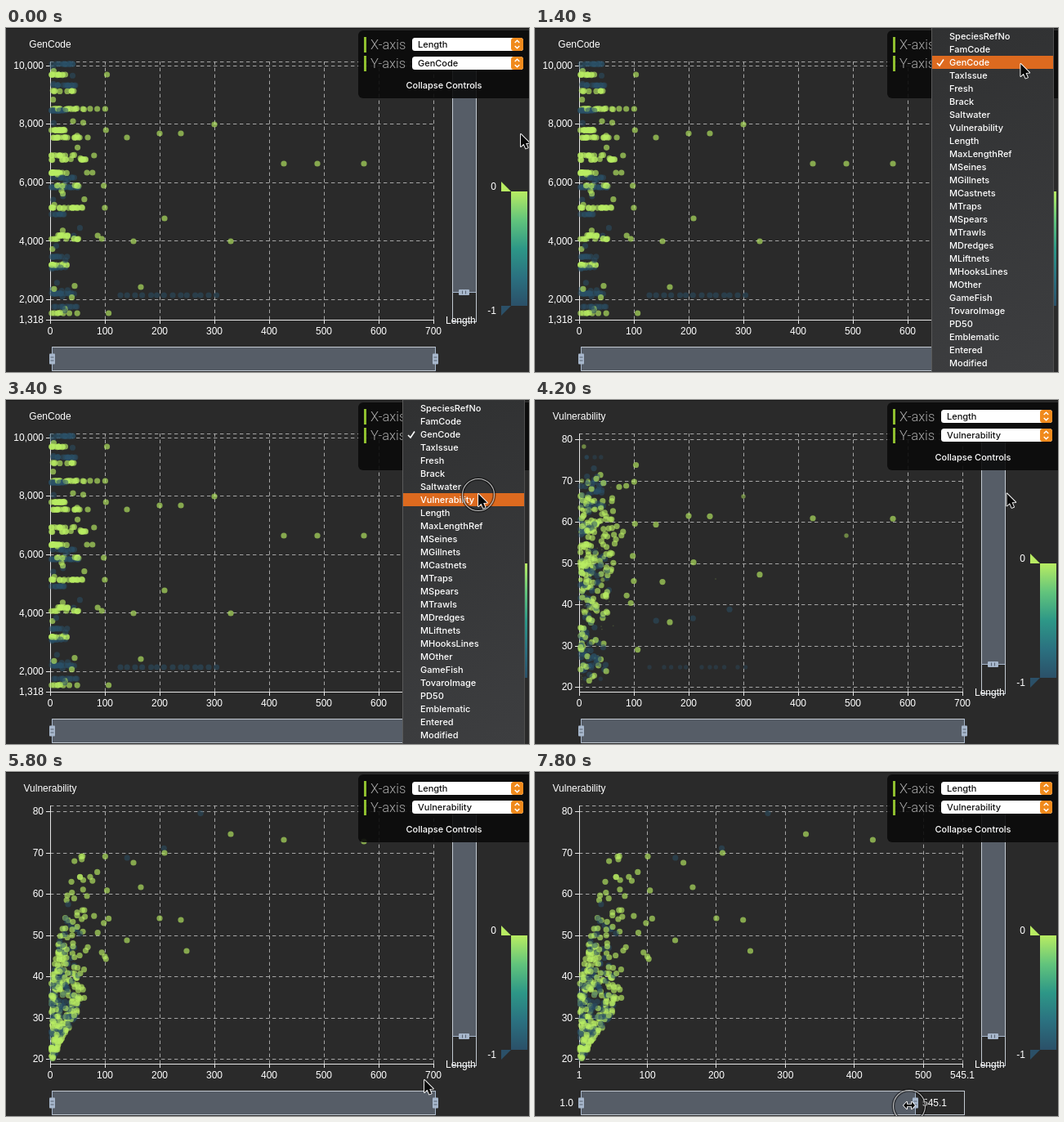
An HTML page with a canvas for the animation above (8 s loop, 640x421 px).

```html
<!DOCTYPE html>
<html lang="en">
<head>
<meta charset="utf-8">
<title>Scatter plot with axis controls</title>
<style>
  html, body { margin: 0; width: 100%; height: 100%; overflow: hidden; background: #2a2a2a; }
  canvas { display: block; width: 640px; height: 421px; }
</style>
</head>
<body>
<canvas id="stage" width="640" height="421"></canvas>
<script>
const ctx = document.getElementById('stage').getContext('2d');
const LOOP = 8000, STEP = 200;
const LABEL = '12px "Liberation Sans", Arial, sans-serif';
const UI = '500 11px Inter, Roboto, sans-serif';
const GREEN = '#b8ec62', BLUE = '#2b5068', WHITE = '#fff', EDGE = '#c3cad2', GRIP = '#a7b7cc';
const LEFT = 54, RIGHT = 523, TOP = 41, BOTTOM = 357;
const MENU_OPEN = 1400, MENU_CLOSE = 3800, SWITCH = 4000, HOVER = 6400, DRAG = 7200;

const FIELDS = ('SpeciesRefNo FamCode GenCode TaxIssue Fresh Brack Saltwater Vulnerability Length ' +
  'MaxLengthRef MSeines MGillnets MCastnets MTraps MSpears MTrawls MDredges MLiftnets MHooksLines ' +
  'MOther GameFish TovaroImage PD50 Emblematic Entered Modified').split(' ');

// pointer: time, x, y
const PATH = [
  [0, 630, 130], [1000, 597, 46], [1600, 593, 43], [3400, 578, 115],
  [4800, 577, 114], [5800, 512, 377], [6600, 521, 400], [DRAG, 521, 400], [7800, 458, 408]
];

// heights of the rows in the first view
const GREEN_ROWS = [57, 77, 99, 125, 134, 156, 161, 177, 193, 220, 254, 258, 290, 349];
const BLUE_ROWS = [44, 70, 101, 183, 195, 228, 280, 293, 325, 341];
// lone dots: x, height before, height after (0 = absent)
const LONE = [
  [340, 166, 83], [438, 166, 85], [381, 166, 0], [275, 261, 76], [188, 129, 179], [214, 129, 181],
  [255, 118, 0], [194, 233, 99], [156, 261, 111], [148, 134, 206], [165, 317, 141], [221, 0, 219]
];

const clamp = (v, a, b) => Math.min(b, Math.max(a, v));
const lerp = (a, b, k) => a + (b - a) * k;
const easeInOut = k => k < .5 ? 4 * k ** 3 : 1 - (2 - 2 * k) ** 3 / 2;

function seeded(s) {
  return () => {
    s = (s + 0x6D2B79F5) | 0;
    let r = Math.imul(s ^ (s >>> 15), 1 | s);
    r = (r + Math.imul(r ^ (r >>> 7), 61 | r)) ^ r;
    return ((r ^ (r >>> 14)) >>> 0) / 4294967296;
  };
}

function makeDots() {
  const rnd = seeded(11), dots = [];
  const add = (x, y1, y2, color, key = rnd()) =>
    dots.push({ v: (x - LEFT) / .67, y1, y2, color, key });

  // vulnerability rises with length, between a steep and a flat bound
  const rise = x => {
    const d = x - LEFT, low = 357 - 1.9 * d, high = Math.max(93, 264 - 5.4 * d);
    return lerp(low, high, rnd() ** 1.35);
  };
  const addRows = (rows, color) => rows.forEach(y => {
    const reach = 16 + 32 * rnd(), n = 7 + 12 * rnd();
    for (let i = 0; i < n; i++) {
      const x = 55.5 + reach * rnd() ** 1.3;
      add(x, y + 5 * (rnd() - .5) ** 3, rnd() < .15 ? 0 : rise(x), color);
    }
  });
  addRows(BLUE_ROWS, BLUE);
  addRows(GREEN_ROWS, GREEN);

  // strays off the rows, and dots only the second view has
  for (let i = 0; i < 80; i++) {
    const x = 56 + 40 * rnd() ** 1.4;
    add(x, i % 2 ? lerp(45, 352, rnd()) : 0, rise(x), i % 4 < 3 ? GREEN : BLUE);
  }
  for (let i = 0; i < 14; i++) {
    const y = GREEN_ROWS[Math.floor(rnd() * GREEN_ROWS.length)];
    add(92 + 36 * rnd(), y, lerp(95, 240, rnd()), GREEN);
  }
  for (let i = 0; i < 14; i++) {
    add(138 + 9 * i + 4 * rnd(), 327, i % 5 === 1 ? lerp(48, 127, rnd()) : 0, BLUE);
  }
  LONE.forEach(d => add(...d, GREEN));
  return dots.sort((a, b) => a.key - b.key);
}
const dots = makeDots();

function text(s, x, y, font = LABEL, color = WHITE, align = 'left') {
  ctx.font = font;
  ctx.fillStyle = color;
  ctx.textAlign = align;
  ctx.textBaseline = 'middle';
  ctx.fillText(s, x, y + .8);
}
function box(x, y, w, h, fill, r = 0) {
  ctx.fillStyle = fill;
  ctx.beginPath();
  ctx.roundRect(x, y, w, h, r);
  ctx.fill();
}
function frame(x, y, w, h, color) {
  ctx.strokeStyle = color;
  ctx.lineWidth = 1;
  ctx.strokeRect(x + .5, y + .5, w - 1, h - 1);
}
function path(pts, close) {
  ctx.beginPath();
  pts.forEach(([x, y]) => ctx.lineTo(x, y));
  if (close) ctx.closePath();
}
function stroke(color, width) {
  ctx.strokeStyle = color;
  ctx.lineWidth = width;
  ctx.stroke();
}
function triangle(x, y, dy, fill) {
  path([[x, y + dy], [x, y], [x + 12, y]], true);
  ctx.fillStyle = fill;
  ctx.fill();
}
function line(x1, y1, x2, y2, color, dash = []) {
  ctx.setLineDash(dash);
  path([[x1, y1], [x2, y2]]);
  stroke(color, 1);
  ctx.setLineDash([]);
}

const handleAt = t => lerp(525, 465, clamp((t - DRAG) / 600, 0, 1));
const valueAt = h => 1 + 609 * (h - 56) / 469;
// labels and plot trail behind the dragged handle
const topLabel = t => valueAt(handleAt(t - 100)).toFixed(1);
const xRange = t => t <= DRAG ? [0, 700] : [1, valueAt(handleAt(t - 190))];

function drawAxes(t, [min, max], toX) {
  const grid = '#a6a6a6', axis = '#e6e6e6', dash = [4.4, 3.6];
  const vuln = t >= SWITCH;
  const [first, step, count, y0, gap] = vuln ? [20, 10, 7, 351.5, 50.5] : [2000, 2000, 5, 332.5, 71.6];
  const drawTick = (v, y) => {
    const py = Math.floor(y) + .5;
    line(LEFT, py, RIGHT, py, grid, dash);
    line(LEFT - 5, py, LEFT, py, axis);
    text(v.toLocaleString('en-US'), 46, y - .5, LABEL, WHITE, 'right');
  };
  for (let i = 0; i < count; i++) drawTick(first + i * step, y0 - i * gap);
  if (!vuln) drawTick(1318, BOTTOM);
  line(LEFT, TOP + .5, RIGHT, TOP + .5, grid, dash);

  const marks = [min];
  for (let v = 100; v < max; v += 100) marks.push(v);
  marks.push(max);
  for (const v of marks) {
    const x = toX(v), px = Math.floor(x) + .5, last = v === max;
    line(px, BOTTOM, px, TOP, grid, dash);
    line(px, BOTTOM, px, BOTTOM + 5, axis);
    if (!last && RIGHT - x < 32) continue;
    text(last && t > DRAG ? topLabel(t) : v, x, 371, LABEL, WHITE, 'center');
  }
  line(LEFT + .5, TOP, LEFT + .5, BOTTOM, axis);
  line(LEFT, BOTTOM + .5, RIGHT, BOTTOM + .5, axis);
  text(vuln ? 'Vulnerability' : 'GenCode', LEFT, 20, LABEL, WHITE, 'center');
}

function drawDots(t, toX) {
  const k = easeInOut(clamp((t - SWITCH) / 500, 0, 1));
  ctx.save();
  ctx.beginPath();
  ctx.rect(LEFT - 4, TOP - 4, RIGHT - LEFT + 8, BOTTOM - TOP + 8);
  ctx.clip();
  for (const { v, y1, y2, color } of dots) {
    const size = !y1 ? k : !y2 ? 1 - k : 1;
    if (!size) continue;
    ctx.globalAlpha = (color === BLUE ? .52 : .65) * size;
    ctx.fillStyle = color;
    ctx.beginPath();
    ctx.arc(toX(v), y1 && y2 ? lerp(y1, y2, k) : y1 || y2, 3.6 * size, 0, 7);
    ctx.fill();
  }
  ctx.restore();
}

function drawGrip(x, y, turn) {
  ctx.save();
  ctx.translate(x, y);
  ctx.rotate(turn);
  box(-6.5, -3.5, 13, 7, GRIP, 1);
  box(-2.5, -2, 1, 4, '#56606e');
  box(1.5, -2, 1, 4, '#56606e');
  ctx.restore();
}

function drawSliders(t) {
  const fill = '#565d67', h = handleAt(t);
  box(546, TOP, 30, 282, fill);
  frame(546, TOP, 30, 319, EDGE);
  line(546, 323.5, 575, 323.5, GRIP);
  drawGrip(560.5, 323.5, 0);
  text('Length', 538, 357.5);

  box(56, 390, h - 56, 30, fill);
  frame(56, 390, 470, 30, EDGE);
  for (const x of [56.5, h + .5]) {
    line(x, 390, x, 420, GRIP);
    drawGrip(x, 405, Math.PI / 2);
  }
  if (t >= HOVER) {
    text('1.0', 47, 405, LABEL, WHITE, 'right');
    text(topLabel(t), h + 9, 405);
  }
}

function drawLegend() {
  const g = ctx.createLinearGradient(0, 200, 0, 340);
  [GREEN, '#62c47c', '#2d9787', '#2b7180', BLUE].forEach((c, i) => g.addColorStop(i / 4, c));
  box(618, 200, 20, 140, g);
  triangle(606, 200, -12, GREEN);
  triangle(606, 340, 12, BLUE);
  text('0', 600, 194, LABEL, WHITE, 'right');
  text('-1', 600, 345.5, LABEL, WHITE, 'right');
}

function drawSelect(y, label, value) {
  box(438, y - 9, 3, 19, '#8fbf2f');
  text(label, 446, y + .4, '300 16.5px Roboto, "Open Sans", sans-serif', '#a8a8a8');
  box(497, y - 8, 136, 16, WHITE, 3.5);
  text(value, 504, y - .3, UI, '#111');
  box(618, y - 8, 15, 16, '#f08a1c', 3.5);
  for (const s of [-1, 1]) {
    path([[622.7, y + s * 2], [625.5, y + s * 4.8], [628.3, y + s * 2]]);
    stroke(WHITE, 1.4);
  }
}

function drawPanel(t) {
  box(431, 3, 216, 83, 'rgba(10,10,10,.9)', 6);
  drawSelect(20, 'X-axis', 'Length');
  drawSelect(43, 'Y-axis', t >= MENU_CLOSE ? 'Vulnerability' : 'GenCode');
  text('Collapse Controls', 536, 70, UI, WHITE, 'center');
}

function drawMenu(y) {
  const g = ctx.createLinearGradient(486, 0, 634, 421);
  g.addColorStop(0, '#303132');
  g.addColorStop(1, '#3d3e40');
  box(486, 0, 148, 421, g);
  line(485.5, 0, 485.5, 421, '#5a5a5a');
  line(634.5, 0, 634.5, 421, '#505050');
  box(486, Math.floor((y - 2) / 16) * 16 + 2, 148, 16, '#dd6a1f');
  FIELDS.forEach((f, i) => text(f, 507, 9.7 + i * 16, UI));
  path([[492, 43], [495, 46], [500, 38.5]]);
  stroke(WHITE, 1.6);
}

function pointer(t) {
  const i = Math.max(1, PATH.findIndex(p => p[0] >= t));
  const [t0, x0, y0] = PATH[i - 1], [t1, x1, y1] = PATH[i];
  const k = clamp((t - t0) / (t1 - t0), 0, 1);
  return [lerp(x0, x1, k), lerp(y0, y1, k)];
}

function drawPointer(t, x, y) {
  ctx.save();
  ctx.translate(x, y);
  ctx.lineJoin = 'round';
  if (t === 1200 || t === 3400 || t >= 6800) {
    ctx.beginPath();
    ctx.arc(0, 1, 19.5, 0, 7);
    stroke('rgba(0,0,0,.45)', 4);
    stroke('#bdbdbd', 1.1);
  }
  if (t >= HOVER) {
    const half = [[-7, 0], [-3, -4.2], [-3, -1.2], [3, -1.2], [3, -4.2]];
    path([...half, ...half.map(([a, b]) => [-a, -b])], true);
  } else {
    path([[0, 0], [0, 15], [3.5, 11.8], [6, 17.5], [8.6, 16.4], [6.2, 10.9], [10.8, 10.7]], true);
  }
  stroke(WHITE, 1.8);
  ctx.fillStyle = '#080808';
  ctx.fill();
  ctx.restore();
}

function draw(t) {
  box(0, 0, 640, 421, '#2a2a2a');
  box(0, 0, 640, 1, '#181818');
  const range = xRange(t), [min, max] = range;
  const toX = v => lerp(LEFT, RIGHT, (v - min) / (max - min));
  const [px, py] = pointer(t);
  drawAxes(t, range, toX);
  drawDots(t, toX);
  drawSliders(t);
  drawLegend();
  drawPanel(t);
  if (t >= MENU_OPEN && t < MENU_CLOSE) drawMenu(py);
  drawPointer(t, px, py);
}

function tick() {
  const t = performance.now() % LOOP;
  draw(Math.floor(t / STEP) * STEP);
  requestAnimationFrame(tick);
}
tick();
</script>
</body>
</html>
```
